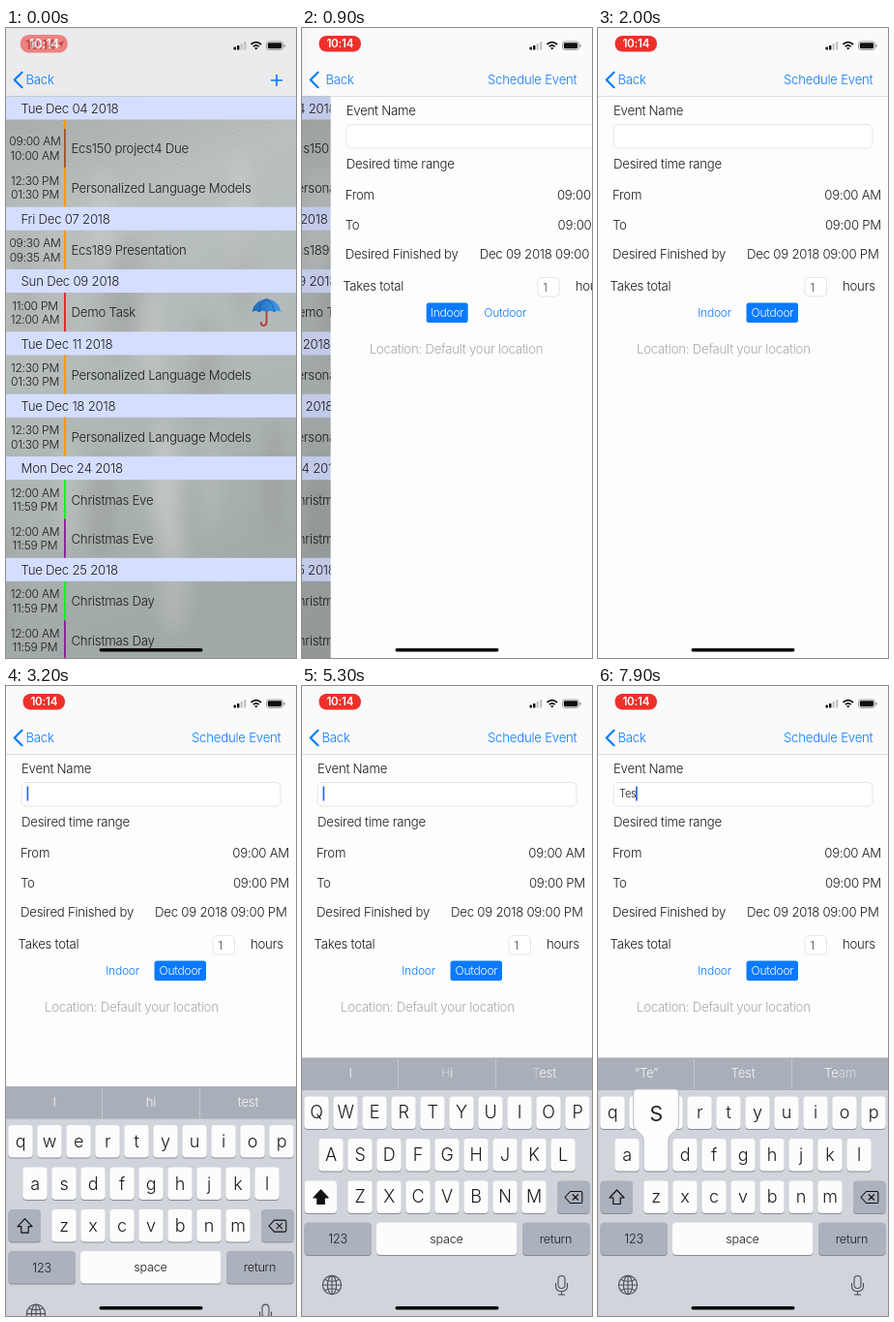
Animation of 300 by 650 pixels, one loop 8000 ms. Source, as an HTML page:

```html
<!DOCTYPE html>
<html lang="en">
<head>
<meta charset="utf-8">
<title>Schedule event</title>
<style>
  html, body { margin: 0; width: 100%; height: 100%; overflow: hidden; background: #fff; }
  svg { display: block; }
  text { font-family: Inter, Roboto, "Liberation Sans", sans-serif; font-weight: 350; letter-spacing: -0.23px; white-space: pre; }
  .key { font-weight: 300; }
  .bold { font-weight: 600; }
</style>
</head>
<body>
<svg id="stage" width="300" height="650" viewBox="0 0 300 650" xmlns="http://www.w3.org/2000/svg"></svg>
<script>
const LOOP = 8000;
const BLUE = '#0a7aff', INK = '#1c1c1c';

// Timeline in ms
const PUSH = 657, OUTDOOR = 1950, KEYBOARD = 2966, SHIFT = 5180;
const TAPS = [
  { key: 't', down: 7360, typed: 7440, up: 7500 },
  { key: 'e', down: 7640, typed: 7730, up: 7780 },
  { key: 's', down: 7850, typed: 7880, up: 8000 },
];
// Letters in parentheses fade in
const SUGGESTIONS = [
  { at: 0, words: ['I', 'hi', 'test'] },
  { at: SHIFT, words: ['I', '(H)i', '(T)est'] },
  { at: 7450, words: ['“T”', 'T(he)', 'T(his)'] },
  { at: 7740, words: ['“Te”', 'Test', 'Te(am)'] },
];

const clamp = v => Math.max(0, Math.min(1, v));
const spring = ms => {
  if (ms <= 0) return 0;
  if (ms >= 600) return 1;
  const x = ms * 0.016;
  return 1 - (1 + x) * Math.exp(-x);
};

// Text placed by its vertical centre
const text = (x, y, str, { size = 13.2, fill = INK, anchor = 'start', attrs = '' } = {}) =>
  `<text x="${x}" y="${y + size * 0.36}" font-size="${size}" fill="${fill}" text-anchor="${anchor}" ${attrs}>${str}</text>`;
const rect = (x, y, w, h, fill, rx = 0, attrs = '') =>
  `<rect x="${x}" y="${y}" width="${w}" height="${h}" rx="${rx}" fill="${fill}" ${attrs}/>`;
const line = (d, color, width, attrs = '') =>
  `<path d="${d}" fill="none" stroke="${color}" stroke-width="${width}" ${attrs}/>`;

// Soft vertical streaks and small drops of a wet window
function rain() {
  let seed = 7, streaks = '', drops = '';
  const random = () => (seed = (seed * 16807) % 2147483647) / 2147483647;
  for (let i = 0; i < 16; i++) {
    const x = random() * 300, y = 130 + random() * 480;
    streaks += `<ellipse cx="${x.toFixed(1)}" cy="${y.toFixed(1)}" rx="${(6 + random() * 10).toFixed(1)}" ry="60" fill="${i % 2 ? '#fff' : '#6f7877'}" opacity=".16"/>`;
  }
  for (let i = 0; i < 260; i++) {
    const x = (random() * 300).toFixed(1), y = 95 + random() ** 1.7 * 550, r = 0.3 + random() * 0.5;
    drops += `<circle cx="${x}" cy="${y.toFixed(1)}" r="${r.toFixed(1)}" fill="#555c5c" opacity=".3"/>`
      + `<circle cx="${x}" cy="${(y + 1).toFixed(1)}" r="${r.toFixed(1)}" fill="#fff" opacity=".3"/>`;
  }
  return rect(0, 70, 300, 580, 'url(#glass)') + `<g filter="url(#soft)">${streaks}</g>` + drops;
}

const umbrella = `
  ${line('M269.5 280V303.5q0 3.5-3 3.5t-2.5-3', '#b5372c', 1.8, 'stroke-linecap="round"')}
  <path d="M254.500 293.500C256 285 262 280 269.500 279.500C277 280 283.500 285 284.500 293.500Q281 290 277.500 293.500Q273.500 290 269.500 293.500Q265.500 290 262 293.500Q258 290 254.500 293.500Z" fill="url(#canopy)"/>
  ${line('M269.5 280Q262 284 262 293M269.5 280Q277 284 277.500 293', '#17539a', 0.8)}`;

const ORANGE = '#ff9500', GREEN = '#12f01c', PURPLE = '#8b1a93';
const models = ['12:30 PM', '01:30 PM', 'Personalized Language Models', ORANGE];
const allDay = (name, color) => ['12:00 AM', '11:59 PM', name, color];
const DAYS = [
  ['Tue Dec 04 2018', ['09:00 AM', '10:00 AM', 'Ecs150 project4 Due', '#a0522d'], models],
  ['Fri Dec 07 2018', ['09:30 AM', '09:35 AM', 'Ecs189 Presentation', ORANGE]],
  ['Sun Dec 09 2018', ['11:00 PM', '12:00 AM', 'Demo Task', '#dd2222']],
  ['Tue Dec 11 2018', models],
  ['Tue Dec 18 2018', models],
  ['Mon Dec 24 2018', allDay('Christmas Eve', GREEN), allDay('Christmas Eve', PURPLE)],
  ['Tue Dec 25 2018', allDay('Christmas Day', GREEN), allDay('Christmas Day', PURPLE)],
];

function agenda() {
  const headerH = 24, rowH = 40.35;
  let y = 70.5, out = rain() + rect(60, 94, 1.8, 10, ORANGE);
  DAYS.forEach(([day, ...events], i) => {
    out += rect(0, y, 300, headerH, '#d5deff') + text(15.5, y + 12.5, day);
    y += headerH + (i ? 0 : 9.5);
    for (const [from, to, name, color] of events) {
      const mid = y + rowH / 2;
      out += rect(60, y, 1.8, rowH, color)
        + text(30, mid - 7, from, { size: 12, anchor: 'middle' })
        + text(30, mid + 7.5, to, { size: 12, anchor: 'middle' })
        + text(67.5, mid + 0.5, name);
      y += rowH;
    }
  });
  return out + umbrella;
}

function form() {
  const border = 'stroke="#e4e4e8"';
  return rect(0, 70, 300, 580, '#fefdfe')
    + text(16, 85.5, 'Event Name')
    + rect(16, 99.5, 268, 24.5, '#fff', 5, border)
    + text(22, 111.5, '', { size: 11, attrs: 'id="typed"' })
    + rect(21.5, 103.5, 1.8, 15, '#2f6fe0', 0.6, 'id="caret"')
    + text(16, 140, 'Desired time range')
    + text(15, 172, 'From') + text(293, 172, '09:00 AM', { anchor: 'end' })
    + text(15, 203, 'To') + text(293, 203, '09:00 PM', { anchor: 'end' })
    + text(15, 233.5, 'Desired Finished by') + text(154, 233.5, 'Dec 09 2018 09:00 PM')
    + text(12.5, 266, 'Takes total')
    + rect(214, 257.5, 22.5, 19.5, '#fff', 4, border)
    + text(219.5, 267.5, '1', { size: 11.5, fill: '#444' })
    + text(253, 266, 'hours')
    + rect(99, 283.5, 43, 20.5, BLUE, 2.5, 'id="choice"')
    + text(120.5, 294, 'Indoor', { size: 12, anchor: 'middle', attrs: 'id="indoor"' })
    + text(180.5, 294, 'Outdoor', { size: 12, anchor: 'middle', attrs: 'id="outdoor"' })
    + text(40, 331.5, 'Location: Default your location', { fill: '#a9a9ac' });
}

const ROWS = [
  { letters: 'qwertyuiop', x: 15, y: 423.5 },
  { letters: 'asdfghjkl', x: 30, y: 467 },
  { letters: 'zxcvbnm', x: 60, y: 510.5 },
];
const KEY_H = 33.5;

function findKey(letter) {
  const row = ROWS.find(r => r.letters.includes(letter));
  return { x: row.x + 30 * row.letters.indexOf(letter), y: row.y };
}

const keycap = (x, y, w, fill, attrs = '') =>
  rect(x, y + 1, w, KEY_H, '#898c91', 4) + rect(x, y, w, KEY_H, fill, 4, attrs);

function keyboard() {
  const grey = '#abb2bd', label = { size: 12.6, anchor: 'middle' };
  let out = rect(0, 383.5, 300, 267, '#d1d5db') + rect(0, 383.5, 300, 33.5, '#a9afb9')
    + line('M99.500 385V416M200.500 385V416', '#c3c8d0', 1);
  [50, 150, 250.5].forEach(x => {
    out += text(x, 399.5, '', { fill: '#f6f7f8', anchor: 'middle', attrs: 'class="hint"' });
  });
  for (const { letters, x, y } of ROWS) {
    [...letters].forEach((letter, i) => {
      const cx = x + i * 30;
      out += keycap(cx - 12.75, y, 25.5, '#fcfcfd')
        + text(cx, y + 16.5, letter, { size: 18, anchor: 'middle', attrs: 'class="key"' });
    });
  }
  out += keycap(2.5, 510.5, 33.5, grey, 'id="shiftKey"')
    + line('M19.500 520L27 528H23.200V534.500H15.800V528H12Z', '#111', 1.2, 'id="shiftIcon" stroke-linejoin="round"')
    + keycap(264, 510.5, 33.5, grey)
    + line('M272 527.5L277.500 521.500H288.500Q289.800 521.500 289.800 523V532Q289.800 533.500 288.500 533.500H277.500ZM279.800 524.500L285.800 530.500M285.800 524.500L279.800 530.500', '#111', 1.1, 'stroke-linejoin="round"')
    + keycap(2.5, 553.5, 69.5, grey) + text(37, 570.5, '123', label)
    + keycap(77, 553.5, 145.5, '#fcfcfd') + text(149.5, 570, 'space', label)
    + keycap(228, 553.5, 69.5, grey) + text(262.5, 570, 'return', label);
  out += `<g fill="none" stroke="#4a4e54" stroke-width="1.1">
    <circle cx="31" cy="618" r="9.600"/><ellipse cx="31" cy="618" rx="4.600" ry="9.600"/>
    <path d="M21.400 618H40.600M31 608.400V627.600M23.500 612.500Q31 616 38.500 612.500M23.500 623.500Q31 620 38.500 623.500"/>
    <rect x="265" y="608.500" width="7" height="13" rx="3.500"/>
    <path d="M262.500 616V619Q262.500 624.500 268.500 624.500T274.500 619V616M268.500 624.500V628M265 628H272"/></g>`;
  return out + `<g id="popup"><path d="M-20 -51H20Q23.500 -51 23.500 -47V-16C23.500 -7 12.750 -7 12.750 2V29.500Q12.750 33.500 9 33.500H-9Q-12.750 33.500 -12.750 29.500V2C-12.750 -7 -23.500 -7 -23.500 -16V-47Q-23.500 -51 -20 -51Z" fill="#fdfdfe" stroke="#b3b7bd" stroke-width=".8"/>
    ${text(0, -28, '', { size: 28, anchor: 'middle', attrs: 'id="popupLetter"' })}</g>`;
}

function statusBar() {
  const bars = [3, 4.5, 6.5, 8.5].map((h, i) =>
    rect(235.5 + i * 3.5, 22.5 - h, 2.4, h, i < 2 ? '#111' : '#c4c4c6', 0.6)).join('');
  return `<g id="clock">${text(20, 17, '10:14', { size: 13, attrs: 'class="bold"' })}<path d="M60 13L53 16.200L56.500 16.800L57 20Z" fill="${INK}"/></g>`
    + `<g id="pill">${rect(17.5, 8, 43.5, 16.5, '#ee302b', 8)}${text(39.3, 16.2, '10:14', { size: 11.6, fill: '#fff', anchor: 'middle', attrs: 'class="bold"' })}</g>`
    + bars
    + line('M253.500 17Q258.700 12.200 264 17M255.700 19.200Q258.700 16.500 261.800 19.200', '#111', 1.7)
    + '<path d="M257 20.500Q258.700 19.300 260.500 20.500L258.700 22.500Z" fill="#111"/>'
    + rect(269.5, 14, 17, 8.5, 'none', 2.4, 'stroke="#8b8b8d" stroke-width=".8"')
    + rect(270.8, 15.3, 14.4, 5.9, '#111', 1.4) + rect(287.5, 16.8, 1.2, 3, '#8b8b8d', 0.6);
}

function navBar() {
  const blue = { fill: BLUE };
  // The translucent bar takes a blurred tint from the page below it
  return `<svg width="300" height="70">${rect(0, 0, 300, 70, '#ebeaec')}
      ${rect(0, -60, 420, 190, '#fbfafb', 0, 'id="barTint" filter="url(#soft)"')}</svg>`
    + rect(0, 70, 300, 0.6, '#c9c9cc')
    + line('M16.600 45.800L8.700 53.500L16.600 61.200', BLUE, 2.2, 'stroke-linecap="round" stroke-linejoin="round"')
    + `<g id="oldNav">${text(20.5, 53.5, 'Back', blue)}${line('M274 54H286M280 48V60', BLUE, 1.7, 'id="plus"')}</g>`
    + `<g id="newNav"><g id="newBack">${text(20.5, 53.5, 'Back', blue)}</g>${text(192, 53.5, 'Schedule Event', blue)}</g>`;
}

const stage = document.getElementById('stage');
stage.innerHTML = `<defs>
    <linearGradient id="glass" x1="0" y1="0" x2=".2" y2="1">
      <stop offset="0" stop-color="#a5a9a9"/><stop offset=".25" stop-color="#b9bfbf"/>
      <stop offset=".55" stop-color="#b3baba"/><stop offset="1" stop-color="#a1a8a8"/>
    </linearGradient>
    <linearGradient id="canopy"><stop offset="0" stop-color="#1f66b8"/><stop offset="1" stop-color="#3f9be6"/></linearGradient>
    <filter id="soft" x="-20%" y="-20%" width="140%" height="140%"><feGaussianBlur stdDeviation="9"/></filter>
  </defs>
  <g id="agenda">${agenda()}</g>
  ${rect(0, 70, 300, 580, '#000', 0, 'id="dim"')}
  <g id="form">${form()}</g>
  ${navBar()}${statusBar()}
  <g id="keyboard">${keyboard()}</g>
  ${rect(96.5, 640, 107, 3.4, '#050505', 1.7)}`;

const el = {};
stage.querySelectorAll('[id]').forEach(node => { el[node.id] = node; });
const keys = [...stage.querySelectorAll('.key')];
const hints = [...stage.querySelectorAll('.hint')];
const set = (node, attrs) => { for (const name in attrs) node.setAttribute(name, attrs[name]); };
const move = (node, x, y) => set(node, { transform: `translate(${x} ${y})` });

function drawPush(t) {
  const p = spring(t - PUSH);
  move(el.agenda, -90 * p, 0);
  move(el.form, 300 * (1 - p), 0);
  move(el.newBack, 40 * (1 - p), 0);
  move(el.barTint, 340 - 380 * p, 0);
  set(el.dim, { opacity: 0.1 * p });
  set(el.oldNav, { opacity: clamp(1 - 2 * p) });
  set(el.newNav, { opacity: clamp(1.2 * p - 0.1) });
  set(el.plus, { opacity: t > PUSH - 120 ? 0.3 : 1 });
}

function drawClock(t) {
  const p = clamp(t / 300), scale = 1.13 - 0.13 * p;
  set(el.pill, { opacity: 0.55 + 0.45 * p, transform: `translate(39.300 16.200) scale(${scale}) translate(-39.300 -16.200)` });
  set(el.clock, { opacity: 0.6 * (1 - p) });
}

function drawForm(t) {
  const outdoor = t >= OUTDOOR;
  set(el.choice, outdoor ? { x: 153.5, width: 53.5 } : { x: 99, width: 43 });
  set(el.indoor, { fill: outdoor ? BLUE : '#fff' });
  set(el.outdoor, { fill: outdoor ? '#fff' : BLUE });

  const count = TAPS.filter(tap => t >= tap.typed).length;
  el.typed.textContent = 'Tes'.slice(0, count);
  const phase = (t - KEYBOARD) % 1000;
  const blink = phase < 550 ? 1 : clamp(1 - (phase - 550) / 120) + clamp((phase - 900) / 100);
  set(el.caret, {
    x: 21.5 + (count ? el.typed.getComputedTextLength() : 0),
    opacity: t < KEYBOARD ? 0 : t > TAPS[0].down ? 1 : blink,
  });
}

function drawKeyboard(t) {
  move(el.keyboard, 0, 267 * (1 - spring(t - KEYBOARD)));

  const upper = t >= SHIFT && t < TAPS[0].up;
  const cased = letter => upper ? letter.toUpperCase() : letter;
  keys.forEach(key => { key.textContent = cased(key.textContent.toLowerCase()); });
  set(el.shiftKey, { fill: upper ? '#fcfcfd' : '#abb2bd' });
  set(el.shiftIcon, { fill: upper ? '#111' : 'none' });

  const { at, words } = SUGGESTIONS.filter(s => t >= s.at).pop();
  const fade = clamp((t - at) / 260);
  hints.forEach((hint, i) => {
    hint.innerHTML = words[i].replace(/\((.+)\)/, `<tspan fill-opacity="${fade}">$1</tspan>`);
  });

  const tap = TAPS.find(({ down, up }) => t >= down && t < up);
  set(el.popup, { visibility: tap ? 'visible' : 'hidden' });
  if (tap) {
    const { x, y } = findKey(tap.key);
    move(el.popup, x, y);
    el.popupLetter.textContent = cased(tap.key);
  }
}

function draw(t) {
  drawPush(t);
  drawClock(t);
  drawForm(t);
  drawKeyboard(t);
}

const start = performance.now();
function tick(now) {
  draw(Math.max(0, now - start) % LOOP);
  requestAnimationFrame(tick);
}
draw(0);
requestAnimationFrame(tick);
</script>
</body>
</html>
```
